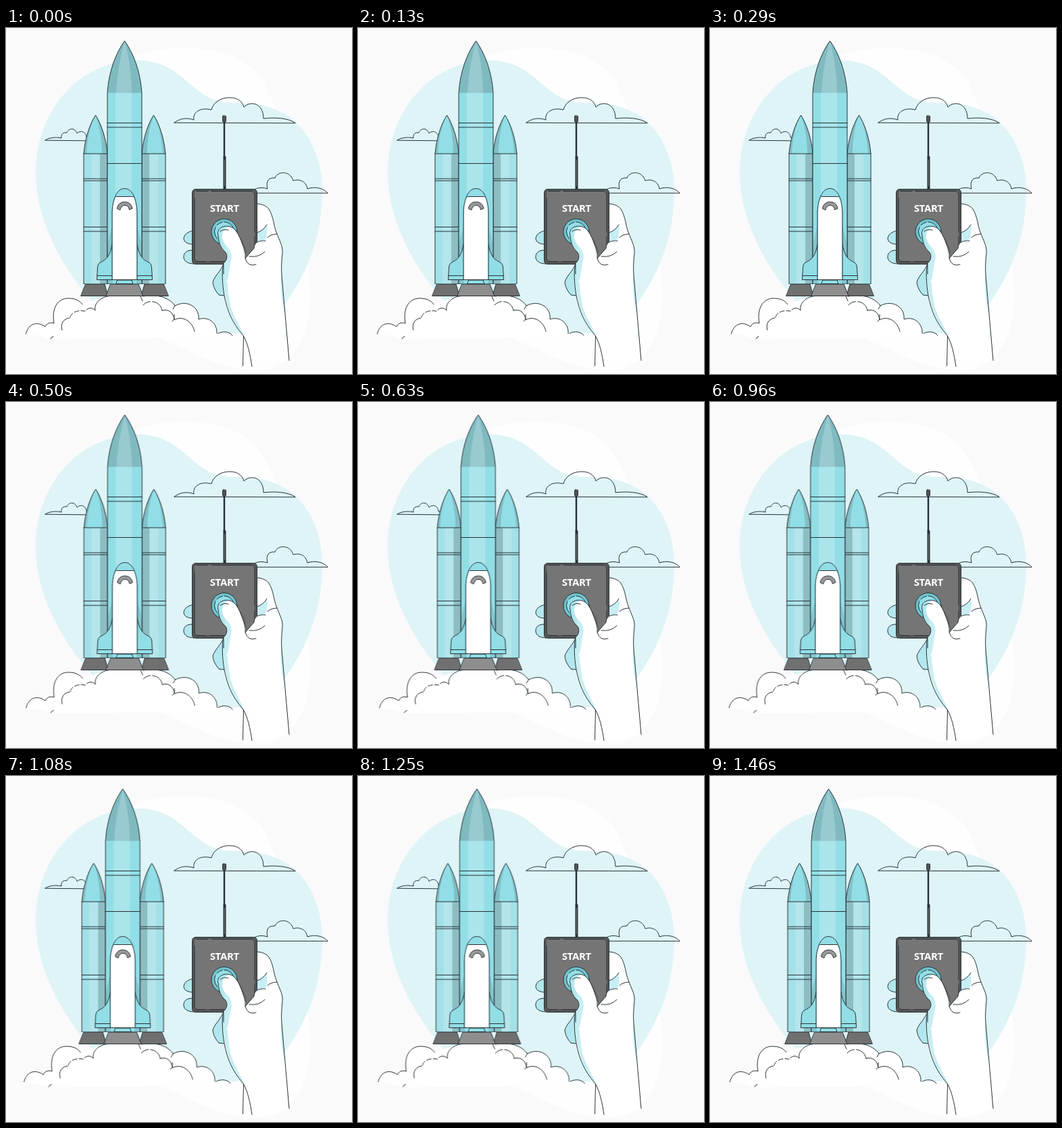
Recreate the animation shown at these times as an HTML page. Size 512 px wide and 512 px high, loop 1500 ms.

```html
<!DOCTYPE html>
<html lang="en">
<head>
<meta charset="utf-8">
<title>Launch</title>
<style>
  html, body { margin: 0; width: 100%; height: 100%; overflow: hidden; background: #fafafa; }
  svg { display: block; width: 100%; height: 100%; }
  .ink { stroke: #263238; stroke-width: 1; stroke-linecap: round; stroke-linejoin: round; }
  .line { fill: none; }
  .white { fill: #fff; }
  .sky { fill: #dff4f7; }
  .cyan { fill: #92dee6; }
  .pale { fill: #a9e5ea; }
  .skin { fill: #c6eef3; }
  .finger { fill: #b2e7ed; }
  .shade { fill: #8dbdc3; }
  .launch { animation: shake 1.5s cubic-bezier(.36, .07, .19, .97) infinite; }
  .label { font: 600 15px "Noto Sans", "Open Sans", sans-serif; font-stretch: 62.5%; letter-spacing: -.3px; fill: #fff; text-anchor: middle; }
  @keyframes shake {
    10%, 90% { transform: translateX(-1px); }
    20%, 80% { transform: translateX(2px); }
    30%, 50%, 70% { transform: translateX(-4px); }
    40%, 60% { transform: translateX(4px); }
  }
</style>
</head>
<body>
<svg viewBox="0 0 512 512">
  <defs>
    <clipPath id="tankClip"><path d="M150 379V96C152 65 162 38 175.5 19C189 38 199 65 201 96V379Z"/></clipPath>
    <clipPath id="boosterClip"><path d="M115 379V186C117 163 124 142 132.5 129C141 142 148 163 150 186V379Z"/></clipPath>
    <g id="booster">
      <g clip-path="url(#boosterClip)">
        <path class="cyan" d="M115 129H150V186H115Z"/>
        <path fill="#a4e0e7" d="M115 186H126V379H115Z"/>
        <path fill="#b3e5eb" d="M126 186H139V379H126Z"/>
        <path class="shade" d="M139 186H150V379H139Z"/>
        <path fill="#82bec5" d="M132.5 129C139 146 142 166 142 186H150V129Z"/>
        <path fill="#82bec5" d="M132.5 129C124 145 120 166 119 186H115V129Z"/>
      </g>
      <path class="ink line" d="M115 378.500V186C117 163 124 142 132.500 129C141 142 148 163 150 186V378.500ZM115 186H150M115 223H150M115 226H150M115 294.500H150M115 301H150"/>
    </g>
    <path id="wing" class="ink" d="M157 320C154 337 149 343 139 347Q136 349 135.500 354L134.500 372.500H158Z"/>
    <path id="nozzle" class="ink" fill="#707070" d="M118 379H146L151 396.500H111Z"/>
  </defs>

  <path class="white" opacity=".75" d="M188 42C240 22 318 25 358 55C396 85 385 110 420 150C470 210 438 320 450 380C456 450 425 506 375 506C300 506 260 465 200 450Z"/>
  <path class="sky" d="M44 215C44 120 110 48 195 48C250 48 265 84 300 103C330 117 362 105 400 121C445 139 468 190 468 240C468 310 445 365 410 412C390 438 370 450 340 452H180C110 400 44 305 44 215Z"/>

  <g class="ink line">
    <path d="M249 140C257 134 267 132 278 136C276 124 288 117 304 121C307 109 319 103 331 103C343 103 350 109 352 117C362 107 381 111 381 134C397 132 418 133 428 140.500Z"/>
    <path d="M360 244C366 238 376 234 387 238C384 226 389 221 398 222C402 211 421 211 425 226C433 223 444 226 446 238C457 234 470 237 476 244Z"/>
    <path d="M58 166C64 162 74 161 82 163C81 157 85 154 90 155C93 147 103 148 105 156C112 150 119 155 119 162H123V166.500Z"/>
  </g>

  <g class="launch">
    <path class="white" d="M29 453C33 438 45 433 58 442C60 437 65 435 71 437C67 414 77 400 92 400C102 400 109 403 113 409L150 396H202C225 393 240 399 250 411C269 401 287 414 285 431C300 426 313 437 312 452Q325 447 335 456L200 459L66 461Q50 454 29 453Z"/>
    <g class="ink line">
      <path d="M29.500 452.500C33 438 45 433 58 442C60 437 65 435 71 437C67 414 77 400 92 400C102 400 109 403 113 409"/>
      <path d="M66 460Q67 457 70 456.500M83 447C80 438 85 430 94 429"/>
      <path d="M95 428C97 420 107 417 117 419" stroke-dasharray="7 3"/>
      <path d="M119 417C123 413 129 414 132 418C130 407 140 398 153 396.500"/>
      <path d="M199 397L202 404M203 397C224 393 242 399 250 411C269 401 287 414 285 431C300 426 313 437 312 452"/>
      <path d="M314 452C321 448 331 449 335 455M246 434L249 431V424M250 411L247 416"/>
      <path d="M203 410C212 400 229 405 231 418" stroke-dasharray="12 3 22 3"/>
      <path d="M231 418C240 415 248 421 249 432C261 425 276 434 279 449"/>
    </g>

    <use href="#nozzle"/>
    <use href="#nozzle" transform="matrix(-1 0 0 1 351 0)"/>
    <path class="ink" fill="#8e8e8e" d="M155 379H196L203 396.500H148Z"/>

    <use href="#booster"/>
    <use href="#booster" transform="matrix(-1 0 0 1 351 0)"/>

    <g clip-path="url(#tankClip)">
      <path class="cyan" d="M150 19H201V379H150Z"/>
      <path class="pale" d="M162 96H186V379H162Z"/>
      <path fill="#7fbac1" d="M150 19H201V96H150Z"/>
      <path fill="#98cad0" d="M175.500 19C169 43 164 70 163 96H186C186 70 182 43 175.500 19Z"/>
      <path fill="#82c6ce" d="M150 320L158 290V379H150ZM201 320L193 290V379H201Z"/>
    </g>
    <path class="ink line" d="M150 378.500V96C152 65 162 38 175.500 19C189 38 199 65 201 96V378.500ZM150 140.500H201M150 147H201M150 200.500H201"/>

    <use href="#wing" class="cyan"/>
    <use href="#wing" class="cyan" transform="matrix(-1 0 0 1 351 0)"/>
    <path class="ink line" d="M135 366.500H158M193 366.500H216"/>
    <path class="ink cyan" d="M157 372V272C158 253 164 237.500 175.500 237.500C187 237.500 193 253 194 272V372Z"/>
    <path class="white" d="M158 372V272Q158 258 163 249.500H188Q193 258 193 272V372Z"/>
    <path class="ink line" d="M163 249.500H188"/>
    <path class="ink" fill="#999" d="M164.500 267C166 254 185 254 187 267L182.500 269C181 260 171 260 169 269Z"/>
    <path class="ink cyan" d="M165 373H186L188 378.500H163Z"/>
    <path class="ink line" d="M157 372.500H194"/>
  </g>

  <g class="ink">
    <path class="finger" d="M277 300C270 301 264 305 263 311C263 317 269 320 277 320Z"/>
    <path class="finger" d="M277 329C268 328 262 333 263 340C264 346 270 349 279 349Z"/>
    <path class="finger" d="M322 349C318 360 309 366 306 376C307 385 311 390 315 395L323 396L331 370Z"/>
    <path class="line" d="M351.500 456L350.500 500"/>
  </g>

  <path class="white" d="M366 260C380 260 386 264 389 268C396 279 396 293 400 302C404 314 410 322 409 333C408 344 407 354 408 366L419 492L364 501C361 482 358 467 351 455C334 435 328 420 323 396C320 378 319 361 322 348Z"/>
  <path class="skin" d="M322 349C318 372 324 405 335 430Q342 445 352 456L356 470C355 452 339 435 332 410Q326 382 328 349ZM408 362L413 424Q404 388 408 362ZM371 303Q381 300 386 291Q388 303 384 313L371 318Z"/>
  <path class="ink line" d="M369 260C380 260 386 264 389 268C396 279 396 293 400 302C404 314 410 322 409 333C408 344 407 354 408 366L419 492M322 348C319 361 320 378 323 396C328 420 334 435 351 455C358 467 361 482 364 501"/>
  <path class="ink line" d="M371 303Q381 300 386 291M387 310Q392 305 401 305"/>

  <path d="M323 136V192" stroke="#263238" stroke-width="2.500"/>
  <path d="M323.500 190V238" stroke="#263238" stroke-width="4"/>
  <path d="M323.500 195V234" stroke="#777" stroke-width="1"/>
  <rect class="ink" x="320.500" y="130" width="5" height="9" rx="1" fill="#555"/>

  <rect class="ink" x="275.500" y="238.500" width="96" height="111" rx="5" fill="#565656"/>
  <rect x="279" y="241" width="89" height="104" rx="3" fill="#757575"/>
  <path class="ink line" d="M282 241.500H299M304 241.500H362Q368 241.500 368 247V301M368 309V339Q368 345.500 362 345.500H302M295 345.500H284Q279 345.500 279 340V251"/>
  <text class="label" x="323.300" y="271.500">START</text>

  <path fill="#656565" d="M342 304Q354 315 357 339L369 326V335H350Z"/>
  <circle class="ink" cx="323" cy="301.500" r="19" fill="#6fc4ce"/>
  <circle class="ink cyan" cx="323" cy="301.500" r="14.500" stroke-dasharray="18 4 9 3"/>

  <path class="white" d="M314 307C311 297 322 291 332 294C342 297 347 312 352 326Q356 336 354 341L367 326Q367 318 376 314L388 320L377 356L345 395L322 370L322 348C326 345 329 338 325 332C319 327 315 320 314 307Z"/>
  <path class="skin" d="M314 307C311 298 320 292 329 294C319 299 317 308 323 319Q333 327 334 338L328 372L322 378V348C326 345 329 338 325 332C319 327 315 320 314 307Z"/>
  <path class="finger" d="M314 307C311 298 320 292 329 294C319 299 317 308 323 319L325 331Q315 323 314 307Z"/>
  <path class="ink line" d="M322 364V348C326 345 329 338 325 332C319 327 315 320 314 307C311 297 322 291 332 294C342 297 347 312 352 326Q355 335 354 341Q358 354 370 350M354 341L367 326C367 318 373 314 384 315M360 338Q374 340 383 331M317 301Q322 297 329 299"/>
</svg>
</body>
</html>
```
